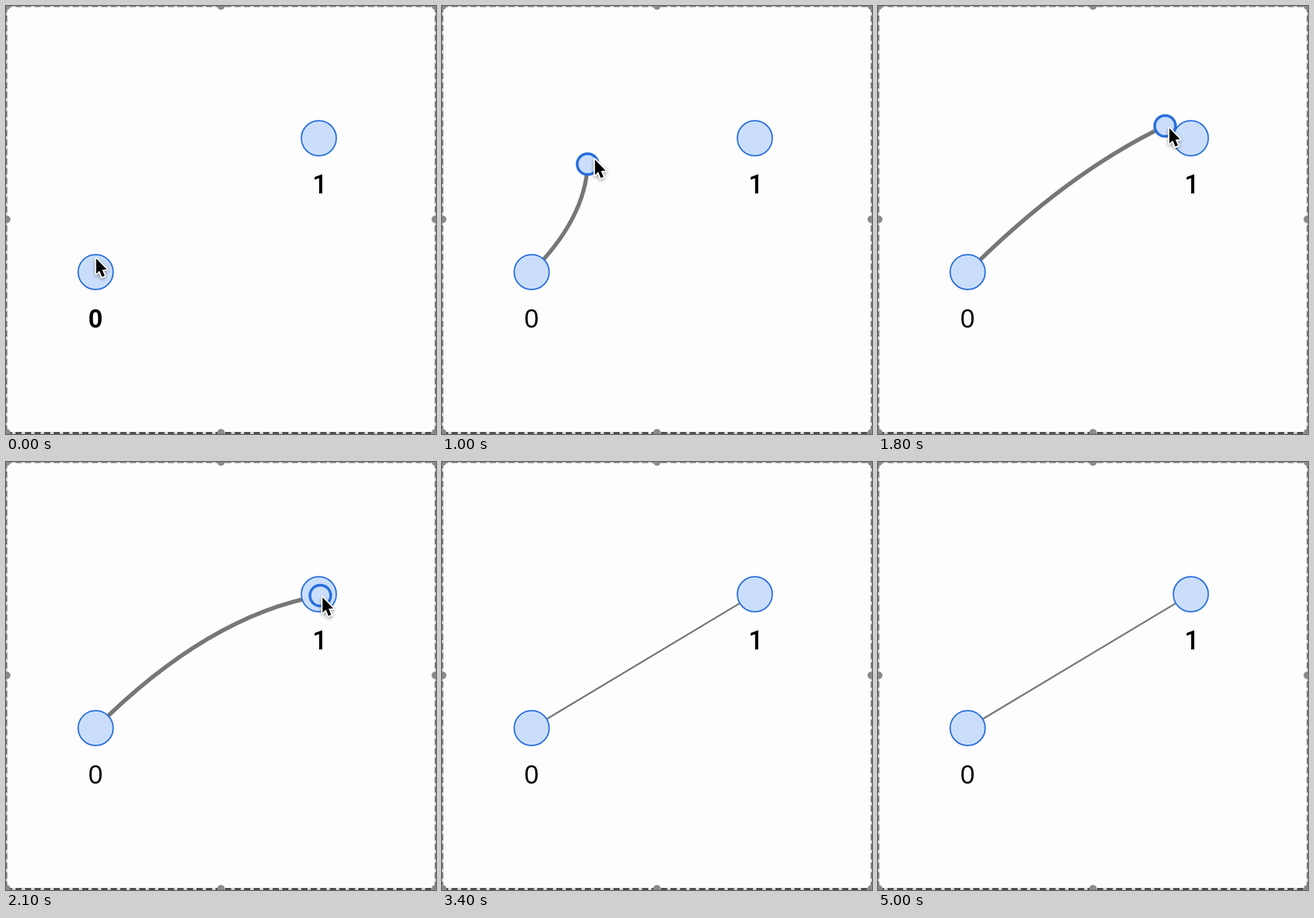
Animation of 632x628 px, one loop 5.1 s. Source, as an HTML page with a canvas:

```html
<!DOCTYPE html>
<html lang="en">
<head>
<meta charset="utf-8">
<title>Linking two nodes</title>
<style>
html, body { margin: 0; width: 100%; height: 100%; overflow: hidden; background: #fdfdfd; }
canvas { display: block; }
</style>
</head>
<body>
<canvas id="stage" width="632" height="628"></canvas>
<script>
const W = 632, H = 628, LOOP = 5100, STEP = 100;
const DRAG = 600, UNBOLD = 700, RELEASE = 2900, HIDE = 3300;
const FILL = "#cadefc", BLUE = "#2a70dc", GRAY = "#777";
const ctx = document.getElementById("stage").getContext("2d");
const nodes = [
  { x: 131.8, y: 390.4, label: "0", textX: 131.5, base: 472.3, weight: 400, font: "'Liberation Sans', Arial, sans-serif" },
  { x: 459.8, y: 194, label: "1", textX: 461.2, base: 275.3, weight: 500, font: "Roboto, Arial, sans-serif" }
];

// Pointer path, one point per step from 600 ms on
const path = [
  [131, 369], [144, 352], [166, 318], [190, 275], [214, 232], [245, 205],
  [285, 188], [322, 175], [352, 168], [372, 167.5], [390, 168.5], [406, 171],
  [422, 176], [438, 182], [452, 189], [462, 196], [468, 200], [470, 202]
];
const arrow = [[0, 0], [0, 22.5], [4.9, 17.9], [8.6, 27], [12.6, 25.3], [8.8, 16.6], [15.6, 16.1]];

function pointAt(t) {
  const p = Math.min(Math.max((t - DRAG) / STEP, 0), path.length - 1);
  const i = Math.floor(p), a = path[i], b = path[i + 1] || a;
  return { x: a[0] + (b[0] - a[0]) * (p - i), y: a[1] + (b[1] - a[1]) * (p - i) };
}

function circle(x, y, r, fill, stroke, width) {
  ctx.beginPath();
  ctx.arc(x, y, r, 0, 2 * Math.PI);
  ctx.fillStyle = fill;
  ctx.fill();
  if (stroke) {
    ctx.strokeStyle = stroke;
    ctx.lineWidth = width;
    ctx.stroke();
  }
}

function line(x1, y1, x2, y2, color, width) {
  ctx.strokeStyle = color;
  ctx.lineWidth = width;
  ctx.beginPath();
  ctx.moveTo(x1, y1);
  ctx.lineTo(x2, y2);
  ctx.stroke();
}

function dashes(x1, y1, x2, y2, color, width) {
  line(x1, y1, x2, y2, "#d8d8d8", width);
  ctx.setLineDash([9, 5]);
  line(x1, y1, x2, y2, color, width);
  ctx.setLineDash([]);
}

function drawFrame() {
  dashes(0, 0.5, W, 0.5, "#808080", 2);
  dashes(1, 0, 1, H, "#808080", 2);
  dashes(W - 1, 0, W - 1, H, "#808080", 2);
  dashes(0, H - 1.5, W, H - 1.5, "#4c4c4c", 3);
  for (const x of [1, 316, W - 1])
    for (const y of [0, 313, H - 2])
      if (x !== 316 || y !== 313) circle(x, y, 5.5, "#8a8a8a");
}

// The bend leaves the first node diagonally
function drawCurve(from, to) {
  const dx = to.x - from.x, dy = to.y - from.y;
  const d = Math.max(Math.abs(dx), Math.abs(dy)) / 2;
  let cx = from.x + d * Math.sign(dx), cy = from.y + d * Math.sign(dy);
  if (Math.abs(dx) <= Math.abs(dy)) cx = dx >= 0 ? Math.min(cx, to.x) : Math.max(cx, to.x);
  else cy = dy <= 0 ? Math.max(cy, to.y) : Math.min(cy, to.y);
  ctx.strokeStyle = GRAY;
  ctx.lineWidth = 6;
  ctx.beginPath();
  ctx.moveTo(from.x, from.y);
  ctx.quadraticCurveTo(cx, cy, to.x, to.y);
  ctx.stroke();
}

function drawNode(n, bold) {
  circle(n.x, n.y, 25.7, FILL, BLUE, 2);
  ctx.fillStyle = "#000";
  ctx.textAlign = "center";
  ctx.font = `${bold ? 700 : n.weight} 38px ${n.font}`;
  ctx.fillText(n.label, n.textX, n.base);
}

function drawArrow(p) {
  ctx.save();
  ctx.translate(p.x + 1.5, p.y + 1.5);
  ctx.beginPath();
  for (const q of arrow) ctx.lineTo(...q);
  ctx.closePath();
  ctx.lineJoin = "round";
  ctx.lineWidth = 4;
  ctx.strokeStyle = "#fff";
  ctx.shadowColor = "rgba(0,0,0,.4)";
  ctx.shadowBlur = 5;
  ctx.shadowOffsetY = 2;
  ctx.stroke();
  ctx.shadowColor = "transparent";
  ctx.fillStyle = "#000";
  ctx.fill();
  ctx.restore();
}

function draw(now) {
  const t = Math.floor(now % LOOP / STEP) * STEP;
  const dot = pointAt(t), dragging = t >= DRAG && t < RELEASE;
  const [a, b] = nodes;
  ctx.fillStyle = "#fdfdfd";
  ctx.fillRect(0, 0, W, H);
  drawFrame();
  if (dragging) drawCurve(a, dot);
  if (t >= RELEASE) line(a.x, a.y, b.x, b.y, GRAY, 2.5);
  drawNode(a, t < UNBOLD);
  drawNode(b, false);
  if (dragging) circle(dot.x, dot.y, 15.3, FILL, BLUE, 4);
  // The pointer runs slightly ahead of the dragged dot
  if (t < HIDE) drawArrow(pointAt(t + 30));
}

let start;
function tick(now) {
  start ??= now;
  draw(now - start);
  requestAnimationFrame(tick);
}
requestAnimationFrame(tick);
</script>
</body>
</html>
```
